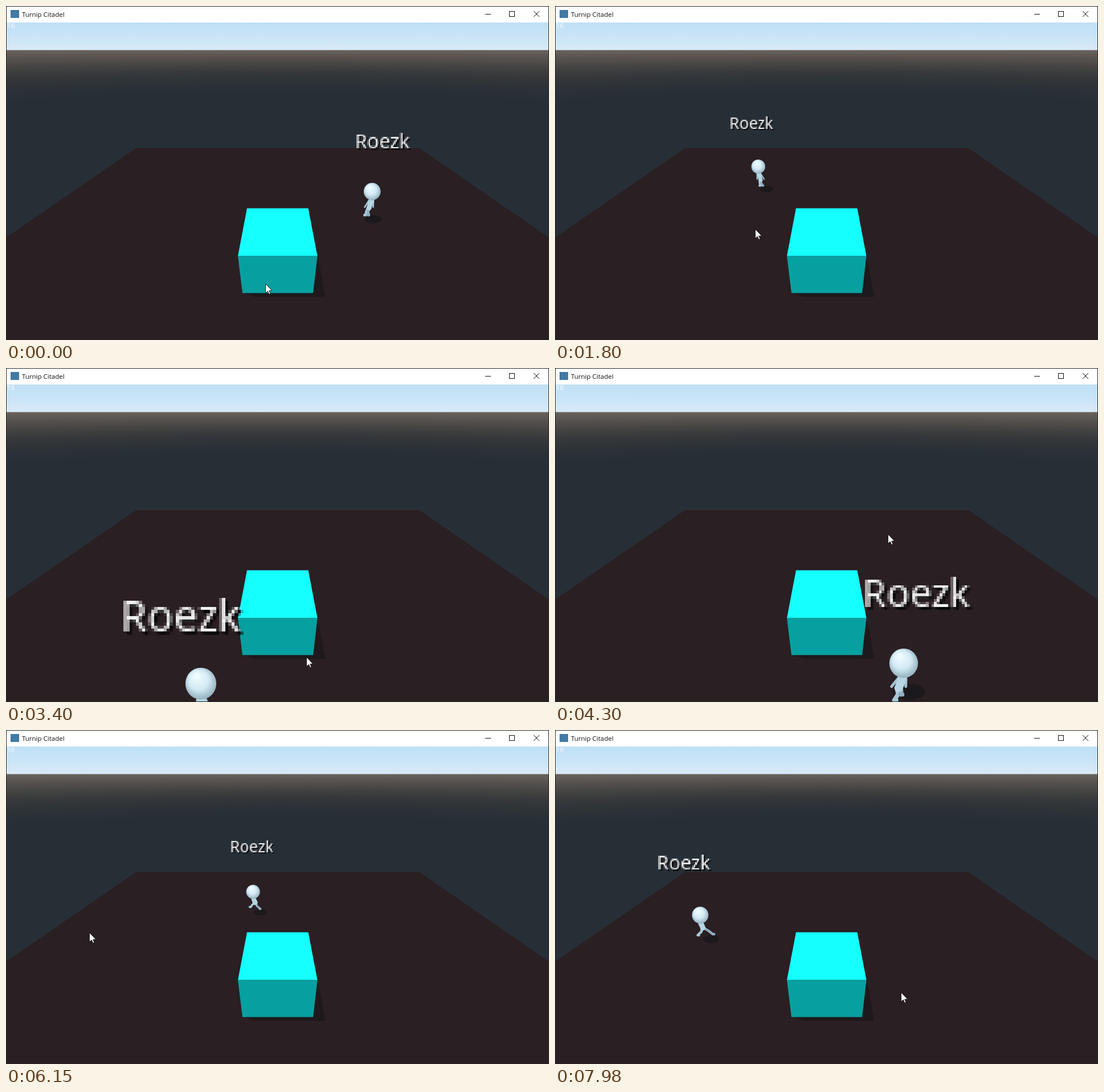
Write an HTML page with a canvas that moves like this. It is 953x587 px and loops after 8 s.

```html
<!DOCTYPE html>
<html lang="en">
<head>
<meta charset="utf-8">
<title>Turnip Citadel</title>
<style>
  html, body { margin: 0; width: 100%; height: 100%; overflow: hidden; background: #262e35; }
  canvas { display: block; }
</style>
</head>
<body>
<canvas id="stage" width="953" height="587"></canvas>
<script>
const LOOP = 8000, CENTER = 476.5, HORIZON = 78, FOCAL = 398;
const WALK_SPEED = 0.0044; // world units per ms
const GLIDE = 550;         // ms the pointer takes to reach its next spot
const STRIDE = 400;        // ms per pair of steps

const lerp = (a, b, k) => a + (b - a) * k;
const ease = k => k * k * (3 - 2 * k);
const clamp = k => Math.min(1, Math.max(0, k));

// Perspective: on-screen size of one world unit at a floor height, and back
const A = 0.277, B = 0.000185;
const sizeAt = y => A * (y - HORIZON) + B * (y - HORIZON) ** 2;
const heightAt = size => HORIZON + (Math.sqrt(A * A + 4 * B * size) - A) / (2 * B);
const toWorld = ([x, y]) => ({ x: (x - CENTER) / sizeAt(y), z: FOCAL / sizeAt(y) });

// Each trip: departure time, then the floor points walked to at constant speed
const HOME = toWorld([634, 369]);
const TRIPS = [
  [720, [363, 317]],
  [2530, [349, 634]],
  [4000, [535, 634], [620, 572], [583, 293]],
  [5660, [152, 359]],
  [7700, [420, 366]]
];
const steps = [{ start: 0, time: 1, from: HOME, to: HOME, facing: -0.8 }];
for (const [departure, ...points] of TRIPS) {
  let start = departure;
  for (const point of points) {
    const from = steps.at(-1).to, to = toWorld(point);
    const length = Math.hypot(to.x - from.x, to.z - from.z);
    const time = length / WALK_SPEED;
    steps.push({ start, time, from, to, facing: (to.x - from.x) / length });
    start += time;
  }
}

function walkerAt(t) {
  const { start, time, from, to, facing } = steps.findLast(step => step.start <= t);
  const k = clamp((t - start) / time);
  const size = FOCAL / lerp(from.z, to.z, k);
  const x = CENTER + lerp(from.x, to.x, k) * size;
  return { x, y: heightAt(size), size, facing, running: k < 1 && from !== to };
}

// [arrival time, x, y]: the pointer waits at each spot, then glides to the next
const SPOTS = [
  [0, 456, 489], [700, 366, 320], [1700, 322, 385], [2250, 662, 480], [2500, 522, 530],
  [3850, 585, 293], [5600, 147, 357], [6880, 170, 402], [7650, 608, 462]
];

function pointerAt(t) {
  const next = SPOTS.findIndex(spot => spot[0] > t);
  if (next < 0) return SPOTS.at(-1).slice(1);
  const [left, x0, y0] = SPOTS[next - 1], [arrival, x1, y1] = SPOTS[next];
  const duration = Math.min(GLIDE, arrival - left);
  const k = ease(clamp(1 - (arrival - t) / duration));
  return [lerp(x0, x1, k), lerp(y0, y1, k)];
}

function polygon(g, color, ...points) {
  g.fillStyle = color;
  g.beginPath();
  points.forEach(([x, y]) => g.lineTo(x, y));
  g.closePath();
  g.fill();
}

function ellipse(g, color, x, y, rx, ry) {
  g.fillStyle = color;
  g.beginPath();
  g.ellipse(x, y, rx, ry, 0, 0, Math.PI * 2);
  g.fill();
}

function line(g, color, width, ...points) {
  g.strokeStyle = color;
  g.lineWidth = width;
  g.beginPath();
  points.forEach(([x, y]) => g.lineTo(x, y));
  g.stroke();
}

function layer(width, height, paint) {
  const canvas = Object.assign(document.createElement('canvas'), { width, height });
  paint(canvas.getContext('2d'));
  return canvas;
}

function gradient(g, y0, y1, colors) {
  const fill = g.createLinearGradient(0, y0, 0, y1);
  colors.forEach((color, i) => fill.addColorStop(i / (colors.length - 1), color));
  return fill;
}

function paintSky(g) {
  g.fillStyle = gradient(g, 28, HORIZON, ['#bfe0f6', '#cae4f7', '#d9eaf8']);
  g.fillRect(0, 28, 953, HORIZON - 28);
  // Lines of equal elevation bend down toward the sides
  for (let x = 0; x < 953; x++) {
    const reach = 75 * Math.hypot(1, (x - CENTER) / 700);
    g.fillStyle = gradient(g, HORIZON, HORIZON + reach,
      ['#69625d', '#56514e', '#454443', '#37393b', '#2f3438', '#2a3037', '#272f36']);
    g.fillRect(x, HORIZON, 1, 509);
  }
  g.fillStyle = '#a3a5a6';
  g.fillRect(0, HORIZON - 1, 953, 1);
}

function paintFloor(g) {
  polygon(g, '#2a1f22', [228, 250], [726, 250], [953, 407], [953, 587], [0, 587], [0, 407]);
  polygon(g, '#1d191c', [545, 442], [549, 448], [560, 511], [436, 511], [416, 503]);
  polygon(g, '#16ffff', [423, 355.5], [530.5, 355.5], [546.5, 439.5], [407, 439.5]);
  polygon(g, '#07a0a0', [407, 439.5], [546.5, 439.5], [539, 504.5], [415, 504.5]);
}

function paintWindow(g) {
  g.fillStyle = '#fff';
  g.fillRect(0, 0, 953, 29);
  g.fillStyle = '#427aa3';
  g.fillRect(8, 7, 15, 14);
  g.fillStyle = '#111';
  g.font = '11.5px "Open Sans", sans-serif';
  g.fillText('Turnip Citadel', 28, 19);
  line(g, '#111', 1, [841, 14.5], [851, 14.5]);
  g.strokeRect(883.5, 9.5, 9, 9);
  line(g, '#111', 1, [926, 9], [936, 19]);
  line(g, '#111', 1, [936, 9], [926, 19]);
  g.fillStyle = '#f4fafd';
  g.font = '13px "Noto Sans", sans-serif';
  g.fillText('16', 1, 39);
  g.strokeStyle = '#242a30';
  g.strokeRect(0.5, 0.5, 952, 586);
}

// The name tag is a tiny text texture, enlarged without smoothing
function paintTag(g) {
  g.font = '14px "Noto Sans", sans-serif';
  for (const [color, offset] of [['#0a0a0b', 1], ['#f4f4f4', 0]]) {
    g.fillStyle = color;
    g.fillText('Roezk', 2 + offset, 17 + offset);
  }
}

const ctx = document.getElementById('stage').getContext('2d');
const scene = layer(953, 587, g => { paintSky(g); paintFloor(g); });
const frame = layer(953, 587, paintWindow);
const tag = layer(46, 24, paintTag);

function drawWalker({ x, y, size, running, facing }, t) {
  const r = size * (0.175 - 0.00022 * size);
  const phase = (t / STRIDE + 0.25) * Math.PI * 2;
  const tilt = (x - CENTER) * 0.055;
  const headX = x + tilt + (running ? facing * 0.2 * r : 0);
  const bob = running ? Math.cos(phase * 2) * 0.08 : Math.sin(t / STRIDE) * 0.03;
  const headY = y - r * ((running ? 2.6 : 2.9) + bob);
  const hip = [x + tilt * 0.35, y - r * 0.95];
  const neck = [lerp(hip[0], headX, 0.75), headY + r * 0.8];

  const shadowDrop = 0.06 - 0.0016 * Math.max(0, size - 95);
  ellipse(ctx, '#1c191c', x + size * 0.11, y + size * shadowDrop, size * 0.15, size * 0.075);

  ctx.lineCap = ctx.lineJoin = 'round';
  for (const side of [-1, 1]) {
    const swing = running ? Math.sin(phase) * side : 0;
    const lift = running ? Math.max(0, Math.cos(phase) * side) * 0.4 : 0;
    const foot = [x + r * (side * 0.2 + swing * facing * 0.75), y - r * (lift + 0.1)];
    const knee = [(hip[0] + foot[0]) / 2 + facing * r * 0.14, (hip[1] + foot[1]) / 2];
    const toe = [foot[0] + facing * r * 0.16, foot[1]];
    line(ctx, side < 0 ? '#a9c9d9' : '#8fb0c2', r * 0.3, [hip[0] + side * r * 0.14, hip[1]], knee, foot, toe);
    const hand = [hip[0] + r * (side * 0.5 - swing * facing * 0.3), hip[1] - r * 0.1];
    line(ctx, '#a3c3d3', r * 0.19, [neck[0] + side * r * 0.25, neck[1] + r * 0.2], hand);
  }
  line(ctx, '#b7d5e3', r * 0.58, [neck[0], neck[1] + r * 0.25], hip);

  const shade = ctx.createRadialGradient(headX - r * 0.3, headY - r * 0.5, r * 0.15, headX, headY, r * 1.15);
  ['#edfaff', '#d3eaf4', '#87a4b4'].forEach((color, i) => shade.addColorStop(i / 2, color));
  ellipse(ctx, shade, headX, headY, r, r * 1.03);
}

function drawTag({ x, y, size }) {
  const scale = size / 39;
  const tagX = CENTER + (x - CENTER) * (1.06 + 0.0012 * size);
  const tagY = 195 + 0.604 * (y - 298) + 0.000432 * (y - 298) * (y - 370);
  ctx.imageSmoothingEnabled = false;
  ctx.drawImage(tag, tagX - 22 * scale, tagY - 12 * scale, tag.width * scale, tag.height * scale);
}

function drawPointer([x, y]) {
  ctx.save();
  ctx.translate(Math.round(x) - 0.5, Math.round(y) - 0.5);
  polygon(ctx, '#fff', [0, 0], [0, 16], [3.7, 12.6], [6.2, 18], [8.6, 17], [6.2, 11.8], [11, 11.4]);
  ctx.lineJoin = 'miter';
  ctx.strokeStyle = '#111';
  ctx.lineWidth = 0.9;
  ctx.stroke();
  ctx.restore();
}

function render(t) {
  const walker = walkerAt(t);
  ctx.drawImage(scene, 0, 0);
  drawWalker(walker, t);
  drawTag(walker);
  ctx.drawImage(frame, 0, 0);
  drawPointer(pointerAt(t));
}

const start = performance.now();
function tick() {
  render((performance.now() - start) % LOOP);
  requestAnimationFrame(tick);
}
tick();
</script>
</body>
</html>
```
